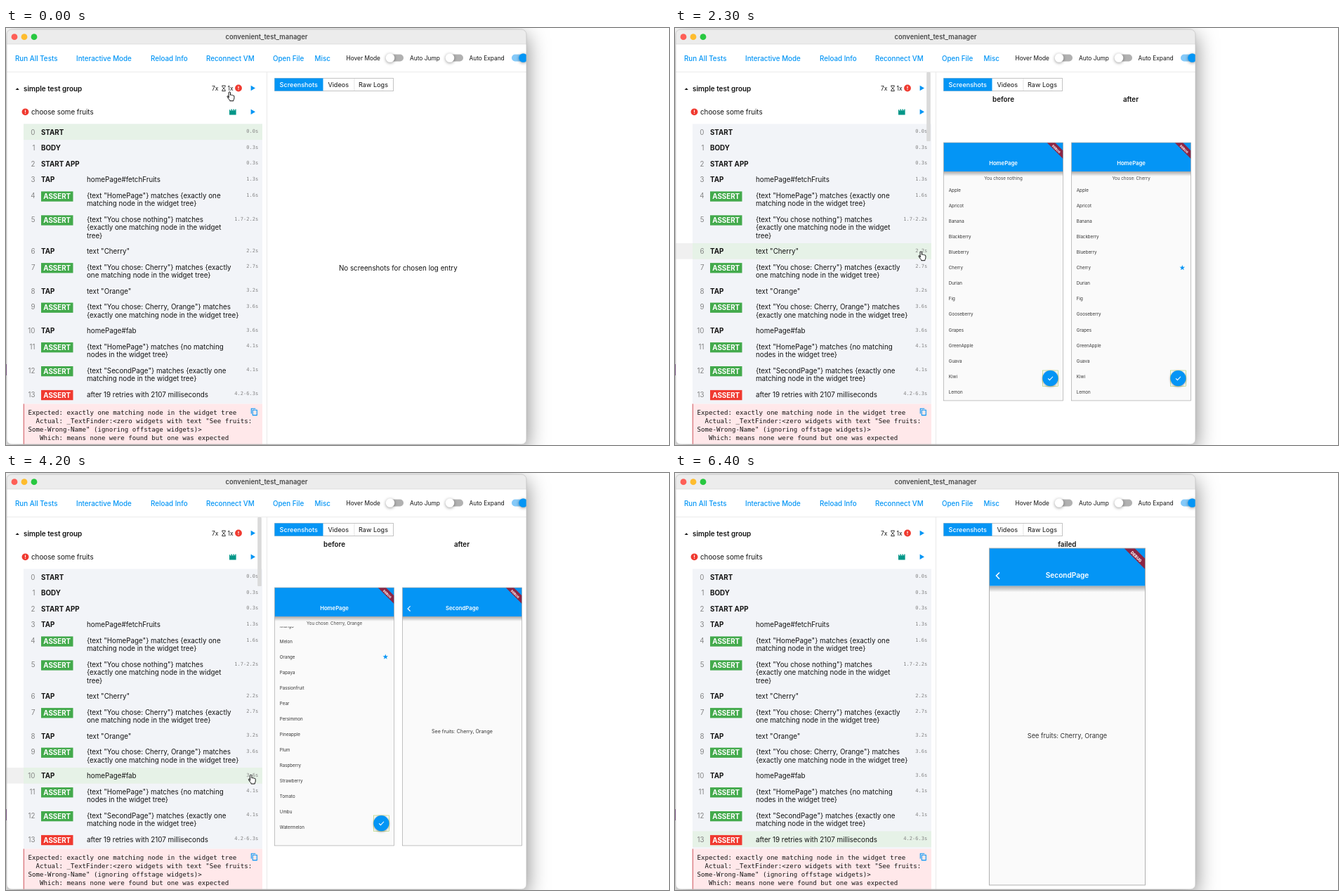
Animation, 944 px wide and 593 px high, one loop 6500 ms. Source, as an HTML page:

```html
<!DOCTYPE html>
<html lang="en">
<head>
<meta charset="utf-8">
<title>Test manager</title>
<style>
html, body { margin: 0; width: 100%; height: 100%; overflow: hidden; background: #fff; }
svg { display: block; width: 944px; height: 593px; font-family: Inter, "Open Sans", sans-serif; font-size: 9.8px; }
text { white-space: pre; }
.mono { font-family: "DejaVu Sans Mono", monospace; }
.window { filter: drop-shadow(0 9px 15px rgba(0, 0, 0, .5)); }
.lift { filter: drop-shadow(0 1.5px 2px rgba(0, 0, 0, .4)); }
</style>
</head>
<body>
<svg id="stage" viewBox="0 0 944 593"></svg>
<script>
const BLUE = '#0495f5', RED = '#f03a30', GREEN = '#43aa4c', INK = '#141414';
const LOOP = 6500, STEP = 100;

const rect = (x, y, w, h, fill, extra = '') =>
  `<rect x="${x}" y="${y}" width="${w}" height="${h}" fill="${fill}" ${extra}/>`;
const circle = (x, y, r, fill, extra = '') =>
  `<circle cx="${x}" cy="${y}" r="${r}" fill="${fill}" ${extra}/>`;
const path = (d, fill, extra = '') => `<path d="${d}" fill="${fill}" ${extra}/>`;
const escapeText = s => String(s).replace(/&/g, '&amp;').replace(/</g, '&lt;');
const text = (x, y, s, { size = 9.8, fill = INK, weight = 400, anchor = 'start', extra = '' } = {}) =>
  `<text x="${x}" y="${y}" font-size="${size}" fill="${fill}" font-weight="${weight}" text-anchor="${anchor}" ${extra}>${escapeText(s)}</text>`;
const middle = (x, y, s, style = {}) => text(x, y, s, { anchor: 'middle', ...style });

// Log entries: [kind, time, ...description lines]
const LOG = [
  ['START', '0.0s'],
  ['BODY', '0.3s'],
  ['START APP', '0.3s'],
  ['TAP', '1.3s', 'homePage#fetchFruits'],
  ['ASSERT', '1.6s', '{text "HomePage"} matches {exactly one', 'matching node in the widget tree}'],
  ['ASSERT', '1.7-2.2s', '{text "You chose nothing"} matches', '{exactly one matching node in the widget', 'tree}'],
  ['TAP', '2.2s', 'text "Cherry"'],
  ['ASSERT', '2.7s', '{text "You chose: Cherry"} matches {exactly', 'one matching node in the widget tree}'],
  ['TAP', '3.2s', 'text "Orange"'],
  ['ASSERT', '3.6s', '{text "You chose: Cherry, Orange"} matches', '{exactly one matching node in the widget tree}'],
  ['TAP', '3.6s', 'homePage#fab'],
  ['ASSERT', '4.1s', '{text "HomePage"} matches {no matching', 'nodes in the widget tree}'],
  ['ASSERT', '4.1s', '{text "SecondPage"} matches {exactly one', 'matching node in the widget tree}'],
  ['ASSERT', '4.2-6.3s', 'after 19 retries with 2107 milliseconds']
];
const LINE = 11.3;
let nextTop = 136.5;
const rows = LOG.map(([kind, time, ...lines], index) => {
  const row = { kind, time, lines, index, top: nextTop, height: LINE * (Math.max(lines.length, 1) + 1) };
  nextTop += row.height;
  return row;
});

function logRow({ kind, time, lines, index, top }) {
  const base = top + 15.1;
  const label = kind === 'ASSERT'
    ? rect(50, top + 5.5, 45.5, 14.3, index === 13 ? RED : GREEN) +
      middle(72.7, base + 1.2, kind, { fill: '#fff', weight: 700 })
    : text(50, base, kind, { weight: 700 });
  return text(41.5, base, index, { fill: '#858585', anchor: 'end' }) + label +
    lines.map((line, i) => text(115, base + i * LINE, line)).join('') +
    text(359.3, top + 12.7, time, { size: 7.05, fill: '#858585', anchor: 'end', extra: 'class="mono"' });
}

function toggle(x, on) {
  return rect(x, 37.6, 25, 9.8, on ? '#85c9f8' : '#b1b1b1', 'rx="4.9"') +
    circle(on ? 736.5 : x + 6, 42.5, 6.3, on ? BLUE : '#fff', 'class="lift"');
}

const alertIcon = (x, y) => circle(x, y, 4.9, RED) +
  rect(x - .55, y - 2.7, 1.1, 3.3, '#fff') + rect(x - .55, y + 1.5, 1.1, 1.1, '#fff');
const playIcon = y => path(`M348.6 ${y - 3.8}l6.4 3.8l-6.4 3.8z`, BLUE);

function windowFrame() {
  const menu = [[13, 'Run All Tests'], [100, 'Interactive Mode'], [206, 'Reload Info'],
    [285, 'Reconnect VM'], [380, 'Open File'], [439.5, 'Misc']];
  const switches = [[484.5, 'Hover Mode', 541], [575, 'Auto Jump', 626], [659.5, 'Auto Expand', 720]];
  return rect(1, 2, 740, 21, '#ececec') + rect(1, 22.5, 740, .8, '#dcdcdc') +
    [['#fe5f57', 12], ['#febc2e', 26], ['#28c840', 40]].map(([c, x]) => circle(x, 12.7, 4.4, c)).join('') +
    middle(371, 16, 'convenient_test_manager', { size: 9.4, weight: 600, fill: '#484848' }) +
    menu.map(([x, s]) => text(x, 46.6, s, { fill: BLUE, weight: 500 })).join('') +
    switches.map(([x, s, tx]) => text(x, 45.6, s, { size: 8.35 }) + toggle(tx, tx === 720)).join('') +
    rect(1, 62, 740, 1, '#ebebeb') + rect(371, 63, 1, 529, '#e9e9e9') +
    path('M13.6 88l2.6-2.8l2.6 2.8z', INK) +
    text(25, 89.6, 'simple test group', { size: 9.95, weight: 600 }) +
    text(293, 88.9, '7x', { size: 8.5 }) + text(315.5, 88.9, '1x', { size: 8.5 }) +
    path('M307.5 82h5M307.5 89.6h5M308 82v1.6l2 2.2l-2 2.2v1.6M312 82v1.6l-2 2.2l2 2.2v1.6', 'none', 'stroke="#222" stroke-width=".9"') +
    alertIcon(331, 85.5) + playIcon(85.5) +
    alertIcon(27.5, 119.3) + playIcon(119.3) +
    text(36, 123.3, 'choose some fruits') +
    path('M318 115.5l1.6 2h1.4l-1-2h1.6l1 2h1.4l-1-2h1.6l1 2h.6v-2h1.4v8h-9.6z', '#009688');
}

function errorBox() {
  const lines = ['Expected: exactly one matching node in the widget tree',
    '  Actual: _TextFinder:<zero widgets with text "See fruits:',
    'Some-Wrong-Name" (ignoring offstage widgets)>',
    '   Which: means none were found but one was expected'];
  return rect(25, 534.5, 340, 57.5, '#ffe8ea') + rect(24.6, 534.5, 1.5, 57.5, '#dc8288') +
    lines.map((s, i) => text(31.5, 550.2 + i * 12, s, { size: 9.15, extra: 'class="mono"' })).join('') +
    path('M349.3 548.5v-7.2h6M351.3 543.2h6v7.4h-6z', 'none', `stroke="${BLUE}" stroke-width="1.1"`);
}

function tabs() {
  return rect(382.5, 71.5, 169, 18, '#fff', 'stroke="#c4c4c4" stroke-width="1"') +
    rect(382.5, 71.5, 69, 18, BLUE) +
    middle(416.8, 83.9, 'Screenshots', { size: 9.1, fill: '#fff', weight: 500 }) +
    middle(473.2, 83.9, 'Videos', { size: 9.1 }) + middle(523, 83.9, 'Raw Logs', { size: 9.1 }) +
    rect(495.5, 72, .8, 17, '#ddd');
}

// Phone screens are laid out on a 222 x 479 board
const FRUITS_TOP = 'Apple Apricot Banana Blackberry Blueberry Cherry Durian Fig Gooseberry Grapes GreenApple Guava Kiwi Lemon'.split(' ');
const FRUITS_END = 'Mango Melon Orange Papaya Passionfruit Pear Persimmon Pineapple Plum Raspberry Strawberry Tomato Umbu Watermelon'.split(' ');

function star(x, y) {
  const points = Array.from({ length: 10 }, (_, i) => {
    const a = Math.PI * (i / 5 - .5), r = i % 2 ? 2.1 : 5.2;
    return `${(x + r * Math.cos(a)).toFixed(2)},${(y + r * Math.sin(a)).toFixed(2)}`;
  });
  return `<polygon points="${points.join(' ')}" fill="${BLUE}"/>`;
}

const fab = () => rect(184, 423, 29, 29, 'none', 'stroke="#a9cf62" stroke-width=".8"') +
  circle(198.3, 437.5, 14.4, BLUE, 'class="lift"') +
  path('M194 437.8l3 3l6-6.4', 'none', 'stroke="#fff" stroke-width="1.4"');

function list(names, firstY, caption, chosen) {
  const items = names.map((name, i) => {
    const y = firstY + i * 28.8;
    return text(9.6, y + 2.9, name, { size: 8.1, fill: '#333' }) + (name === chosen ? star(206, y) : '');
  });
  return middle(111, 69.4, caption, { size: 8.1, fill: '#444' }) +
    `<g clip-path="url(#listClip)">${items.join('')}</g>` + fab();
}

const SCREENS = {
  start: () => rect(76, 253.5, 70.5, 25, '#fff', 'stroke="#cc7fbd" stroke-width="1"') +
    text(76.5, 258.2, 'null: id', { size: 3.6, fill: '#b03aa0' }) +
    middle(111, 268.2, 'Tap to fetch fruits', { size: 7.2, fill: BLUE, weight: 500 }) + fab(),
  fetching: () => middle(111, 268.2, 'Fetching now... (Imagine some network latency here)', { size: 7.15, fill: '#333' }) + fab(),
  none: () => list(FRUITS_TOP, 88.5, 'You chose nothing'),
  cherry: () => list(FRUITS_TOP, 88.5, 'You chose: Cherry', 'Cherry'),
  cherryEnd: () => list(FRUITS_END, 70.9, 'You chose: Cherry'),
  orange: () => list(FRUITS_END, 70.9, 'You chose: Cherry, Orange', 'Orange'),
  second: () => middle(111, 270.3, 'See fruits: Cherry, Orange', { size: 9.2, fill: '#333' })
};

function phone(x, y, scale, screen) {
  const second = screen === 'second';
  return `<g transform="translate(${x} ${y}) scale(${scale})">` +
    rect(0, 0, 222, 479, '#fafafa') + SCREENS[screen]() +
    rect(0, 53.5, 222, 9, 'url(#barShadow)') + rect(0, 0, 222, 53.5, BLUE) +
    middle(111, 42.4, second ? 'SecondPage' : 'HomePage', { size: 10.1, weight: 600, fill: '#fff' }) +
    (second ? path('M14.5 34.5l-4.6 4.6l4.6 4.6', 'none', 'stroke="#fff" stroke-width="1.5"') : '') +
    path('M192 0H207L222 15V30z', '#8c2544') +
    middle(0, 2, 'DEBUG', { size: 5.6, weight: 800, fill: '#fff', extra: 'transform="translate(209.3 12) rotate(45)"' }) +
    rect(0, 0, 222, 479, 'none', 'stroke="#a8a8a8" stroke-width=".9"') + '</g>';
}

const heading = (x, s) => middle(x, 105.1, s, { weight: 600 });
const single = (label, screen) => heading(558.3, label) + phone(447.5, 107, 1, screen);
const pair = (before, after) => heading(467.5, 'before') + heading(649, 'after') +
  phone(382.5, 163, .766, before) + phone(564.5, 163, .766, after);

// Right-hand view for each selectable log entry
const VIEWS = {
  0: () => middle(558.3, 345.3, 'No screenshots for chosen log entry'),
  2: () => single('after', 'start'),
  3: () => pair('start', 'fetching'),
  4: () => single('after', 'fetching'),
  5: () => single('after', 'none'),
  6: () => pair('none', 'cherry'),
  7: () => single('after', 'cherry'),
  8: () => pair('cherryEnd', 'orange'),
  9: () => single('after', 'orange'),
  10: () => pair('orange', 'second'),
  13: () => single('failed', 'second')
};

const HAND = 'M-1.9 2.1V-5a1.2 1.2 0 0 1 2.4 0v3.4q1.1-.9 2 .2q1.2-.6 1.9.4q1.5-.3 1.5 1.2v2.4q0 1.6-1 3v1.1h-5.2v-1.1q-1.6-1.4-3.2-3.9q-.9-1.6-.3-1.9q.8-.4 1.9.9z';

const stage = document.getElementById('stage');
stage.innerHTML = `
  <defs>
    <linearGradient id="barShadow" x2="0" y2="1"><stop stop-color="#000" stop-opacity=".33"/><stop offset="1" stop-color="#000" stop-opacity="0"/></linearGradient>
    <clipPath id="listClip"><rect y="72.6" width="222" height="406"/></clipPath>
    <clipPath id="windowClip"><rect x="1" y="2" width="740" height="590" rx="7"/></clipPath>
  </defs>
  ${rect(1, 2, 740, 590, '#fff', 'rx="7" class="window"')}
  ${rect(0, 478, 2, 16, '#5a2368')}
  <g clip-path="url(#windowClip)">
    ${rect(1, 2, 740, 590, '#fff')}${windowFrame()}${tabs()}
    ${rect(25, 136.5, 340, 398, '#f2f4f8')}
    <rect id="hover" x="1" width="364" fill="#f0f0f0"/>
    <rect id="selected" x="25" width="340" fill="#e6f2e7"/>
    ${rows.map(logRow).join('')}${errorBox()}
    ${rect(358.2, 63, 5.6, 98, '#dadada', 'id="thumb" rx="1"')}
    ${Object.entries(VIEWS).map(([key, draw]) => `<g id="view${key}">${draw()}</g>`).join('')}
    <g id="hand">${path(HAND, '#fff', 'stroke="#111" stroke-width="1" stroke-linejoin="round"')}</g>
  </g>
  ${rect(1, 2, 740, 590, 'none', 'rx="7" stroke="#bdbdbd" stroke-width=".7"')}`;

const $ = id => document.getElementById(id);
const SELECT = [[0, 0], [500, 2], [1100, 3], [1700, 4], [1900, 5], [2200, 6], [2700, 7], [3100, 8], [3600, 9], [4100, 10], [5200, 13]];
const THUMB = [[0, 'none'], [300, '#808080'], [900, '#dadada'], [6100, 'none']];
const POINTER = [[0, 319, 97], [100, 321, 100], [500, 348, 197], [600, 348, 200], [1000, 348, 203], [1200, 350, 222],
  [1500, 350, 224], [1700, 350, 246], [2000, 351, 288], [2300, 351, 324], [2700, 352, 352], [3000, 353, 376],
  [3400, 353, 409], [3700, 353, 410], [4000, 350, 434], [4300, 349, 436], [4900, 343, 520], [5000, 343, 522], [6000, 343, 522]];

const valueAt = (table, t) => table.findLast(entry => entry[0] <= t)[1];

function pointerAt(t) {
  const i = POINTER.findIndex(p => p[0] > t);
  if (i < 0) return null;
  const [t0, x0, y0] = POINTER[i - 1], [t1, x1, y1] = POINTER[i];
  const k = (t - t0) / (t1 - t0);
  return [x0 + (x1 - x0) * k, y0 + (y1 - y0) * k];
}

function placeBand(band, row) {
  band.style.display = row ? '' : 'none';
  if (!row) return;
  band.setAttribute('y', row.top);
  band.setAttribute('height', row.height);
}

function render(t) {
  const chosen = valueAt(SELECT, t), hand = pointerAt(t);
  for (const key in VIEWS) $('view' + key).style.display = +key === chosen ? '' : 'none';
  placeBand($('selected'), rows[chosen]);
  placeBand($('hover'), hand && rows.find(r => hand[1] - 4 >= r.top && hand[1] - 4 < r.top + r.height));
  $('thumb').setAttribute('fill', valueAt(THUMB, t));
  $('hand').style.display = hand ? '' : 'none';
  if (hand) $('hand').setAttribute('transform', `translate(${hand})`);
}

const started = performance.now();
function tick() {
  const t = (performance.now() - started) % LOOP;
  render(Math.floor(t / STEP) * STEP);
  requestAnimationFrame(tick);
}
tick();
</script>
</body>
</html>
```
